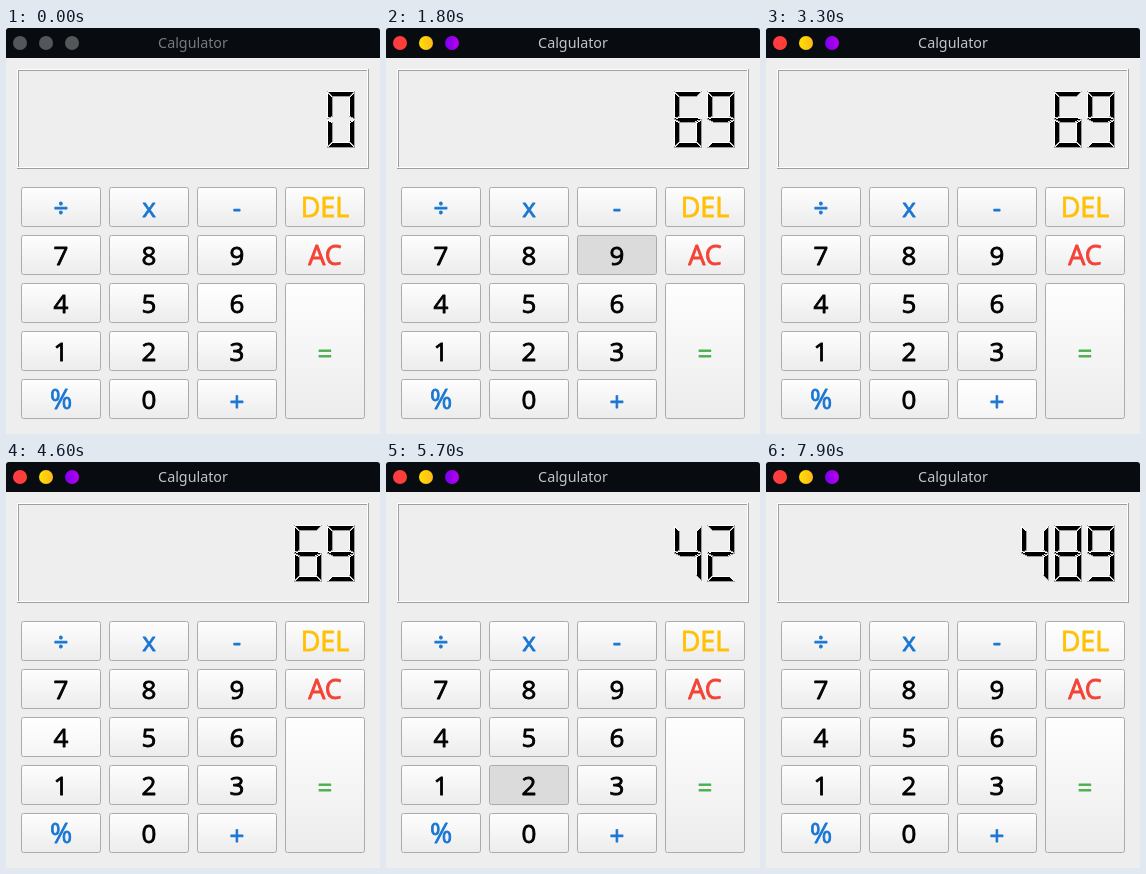
An HTML page that plays this animation: 374 by 406 pixels, repeating every 8000 ms.

```html
<!DOCTYPE html>
<html lang="en">
<head>
<meta charset="utf-8">
<title>Calgulator</title>
<style>
  html, body { margin: 0; width: 100%; height: 100%; overflow: hidden; background: #eee; }
  svg { display: block; width: 374px; height: 406px; }
  text { font-family: "Open Sans", "Noto Sans", sans-serif; text-anchor: middle; }
  .title { font: 14.3px "Noto Sans", "Open Sans", sans-serif; }
  .label { font-size: 26px; stroke-width: .8; stroke-linejoin: round; }
  .lcd { shape-rendering: crispEdges; stroke-linecap: square; }
</style>
</head>
<body>
<svg id="stage" viewBox="0 0 374 406">
  <defs>
    <linearGradient id="normal" x2="0" y2="1">
      <stop stop-color="#fefefe"/><stop offset="1" stop-color="#ececec"/>
    </linearGradient>
    <linearGradient id="hover" x2="0" y2="1">
      <stop stop-color="#fff"/><stop offset="1" stop-color="#f5f5f5"/>
    </linearGradient>
    <linearGradient id="red"><stop stop-color="#ff3a48"/><stop offset="1" stop-color="#ff4030"/></linearGradient>
    <linearGradient id="yellow"><stop stop-color="#ffe000"/><stop offset="1" stop-color="#ffb81c"/></linearGradient>
    <linearGradient id="purple"><stop stop-color="#7a00ee"/><stop offset="1" stop-color="#b800ee"/></linearGradient>
  </defs>
  <rect width="374" height="406" fill="#eee"/>
  <path d="M0 30V3Q0 0 3 0H371Q374 0 374 3V30Z" fill="#080c10"/>
</svg>
<script>
const LOOP = 8000;
const stage = document.getElementById('stage');

function add(tag, attrs, parent = stage) {
  const el = document.createElementNS('http://www.w3.org/2000/svg', tag);
  for (const key in attrs) el.setAttribute(key, attrs[key]);
  parent.appendChild(el);
  return el;
}

// Title bar
const dots = ['red', 'yellow', 'purple'].map((id, i) => ({
  el: add('circle', { cx: 14 + 26 * i, cy: 15, r: 7 }), fill: `url(#${id})`
}));
const title = add('text', { x: 187, y: 20, class: 'title' });
title.textContent = 'Calgulator';

// Etched display frame
const frame = add('g', { class: 'lcd', fill: 'none' });
add('path', { d: 'M11.5 41.5H361.5V139.5H11.5Z', stroke: '#fff' }, frame);
add('path', { d: 'M360.5 42.5H12.5V138.5M11.5 140.5H362.5V41.5', stroke: '#9f9f9f' }, frame);

// Keys
const BLUE = '#1976d2', BLACK = '#000';
const keys = {};

function addKey(name, col, row, color, { rows = 1, size = 26, dy = 0 } = {}) {
  const x = 15 + 88 * col, y = 159 + 48 * row, h = 48 * rows - 8;
  keys[name] = add('rect', {
    x: x + .5, y: y + .5, width: 79, height: h - 1, rx: 2, stroke: '#ababab'
  });
  const label = add('text', {
    x: x + 40, y: y + h / 2 + 10 + dy, class: 'label', fill: color, stroke: color
  });
  label.style.fontSize = size + 'px';
  label.textContent = name;
}

['÷', 'x', '-'].forEach((name, i) => addKey(name, i, 0, BLUE));
['789', '456', '123'].forEach((line, row) =>
  [...line].forEach((name, col) => addKey(name, col, row + 1, BLACK)));
addKey('%', 0, 4, BLUE, { size: 27 });
addKey('0', 1, 4, BLACK);
addKey('+', 2, 4, BLUE, { dy: 1.5 });
addKey('DEL', 3, 0, '#ffc107', { size: 27 });
addKey('AC', 3, 1, '#f44336', { size: 27 });
addKey('=', 3, 2, '#4caf50', { rows: 3, dy: 1.5 });

// Each segment: origin, then points reached with a light (L) or dark (D) edge
const SEGMENTS = [
  '0,0 L27,0 D22,5 D5,5 D0,0',
  '0,1 L5,5 D5,24 D0,26 L0,0',
  '27,1 D0,26 D-5,24 L-5,5 L0,0',
  '0,28 L5,-2 L22,-2 L27,0 D20,3 D7,3 D0,0',
  '0,29 L5,2 D5,21 D0,26 L0,0',
  '27,29 D0,26 D-5,21 L-5,2 L0,0',
  '0,56 L5,-5 L22,-5 L27,0 D0,0'
];
const DIGITS = { 0: '012456', 2: '02346', 4: '1235', 6: '013456', 8: '0123456', 9: '012356' };

function addSegment(spec, parent) {
  const [origin, ...steps] = spec.split(' ');
  const [ox, oy] = origin.split(',').map(Number);
  const edges = { L: '', D: '' };
  let last = [ox, oy];
  const points = [last];
  for (const step of steps) {
    const [x, y] = step.slice(1).split(',').map(Number);
    const next = [ox + x, oy + y];
    edges[step[0]] += `M${last}L${next}`;
    points.push(next);
    last = next;
  }
  const group = add('g', {}, parent);
  add('polygon', { points: points.join(' '), fill: '#000' }, group);
  for (const [edge, stroke] of [['L', '#fff'], ['D', '#9f9f9f']]) {
    add('path', { d: edges[edge], transform: 'translate(.5 .5)', fill: 'none', stroke }, group);
  }
  return group;
}

const cells = [0, 1, 2].map(i => {
  const cell = add('g', { class: 'lcd', transform: `translate(${321 - 33 * i} 63)` });
  return SEGMENTS.map(spec => addSegment(spec, cell));
});

// Timelines: [start, value]
const DISPLAY = [[0, '0'], [1100, '6'], [1800, '69'], [5100, '4'], [5700, '42'], [6600, '420'], [7300, '489']];
const HOVER = [
  [0, '6'], [1500, ''], [1600, '9'], [2500, 'AC'], [3000, ''], [3300, '+'], [4100, ''],
  [4200, '6'], [4400, '5'], [4600, '4'], [5400, '2'], [6100, ''], [6200, '0'],
  [6800, ''], [7000, '='], [7800, ''], [7900, 'DEL']
];
const PRESSED = [
  [0, ''], [1100, '6'], [1200, ''], [1800, '9'], [2000, ''],
  [5100, '4'], [5200, ''], [5700, '2'], [5800, '']
];
const valueAt = (line, t) => line.filter(([start]) => start <= t).pop()[1];

function render(t) {
  const active = t >= 1100;
  for (const dot of dots) dot.el.setAttribute('fill', active ? dot.fill : '#54575a');
  title.setAttribute('fill', active ? '#c3c5c8' : '#777a7f');

  const hover = valueAt(HOVER, t), pressed = valueAt(PRESSED, t);
  for (const name in keys) {
    const fill = name === pressed ? '#dbdbdb' : name === hover ? 'url(#hover)' : 'url(#normal)';
    keys[name].setAttribute('fill', fill);
  }

  const text = valueAt(DISPLAY, t);
  cells.forEach((segments, i) => {
    const lit = DIGITS[text[text.length - 1 - i]] || '';
    segments.forEach((el, n) => el.setAttribute('visibility', lit.includes(n) ? 'visible' : 'hidden'));
  });
}

const begin = performance.now();
function tick() {
  render((performance.now() - begin) % LOOP);
  requestAnimationFrame(tick);
}
tick();
</script>
</body>
</html>
```
